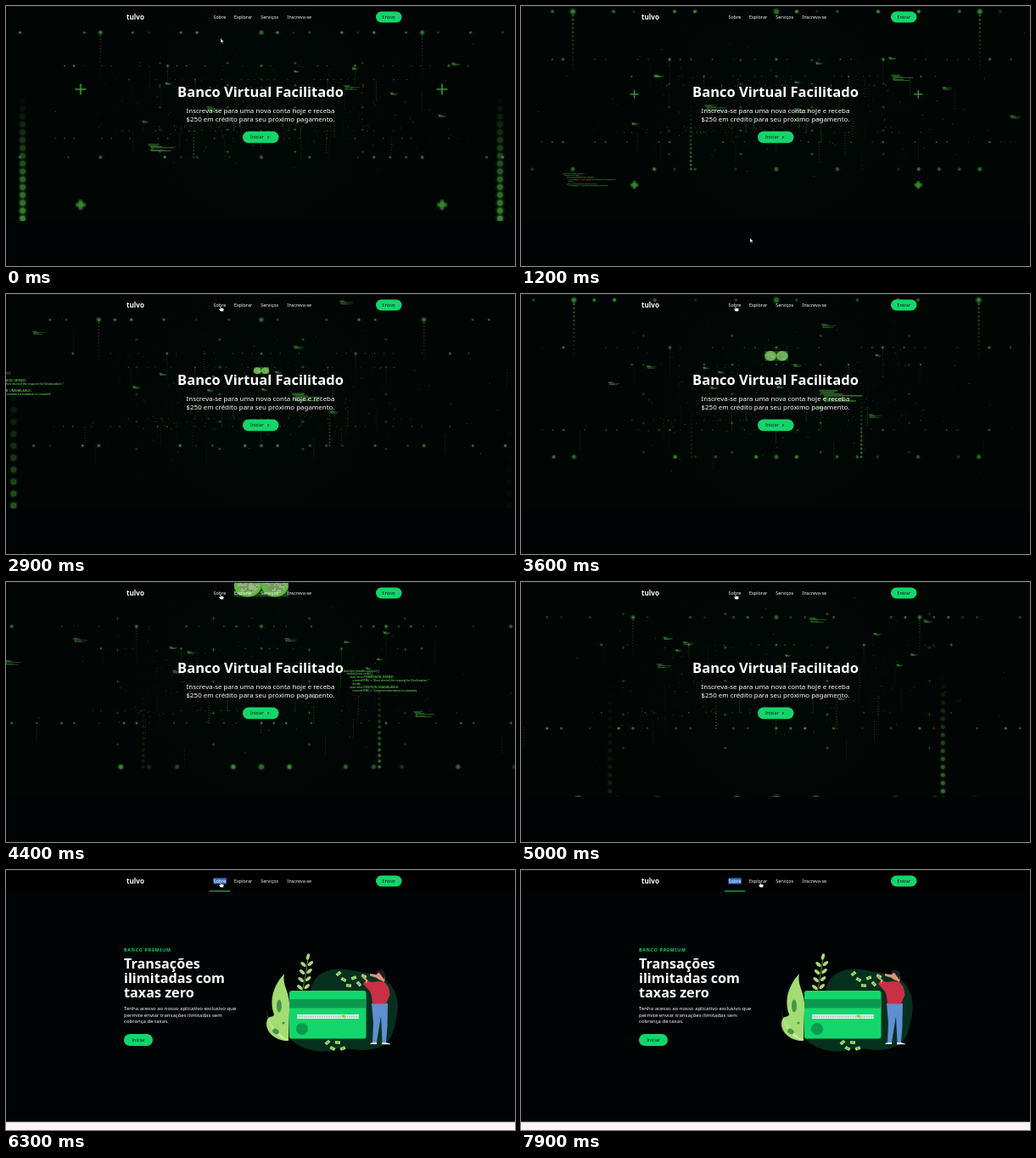
Recreate the animation shown at these times as an HTML page with a canvas. Size 600x306 px, loop 8 s.

```html
<!DOCTYPE html>
<html lang="pt">
<head>
<meta charset="utf-8">
<title>Banco Virtual</title>
<style>
html, body { margin: 0; width: 100%; height: 100%; overflow: hidden; background: #010405; }
#stage { position: relative; width: 600px; height: 306px; overflow: hidden; }
canvas, svg { position: absolute; left: 0; top: 0; display: block; }
text { font-family: "Noto Sans", "Open Sans", sans-serif; fill: #fff; }
.bold { font-weight: 700; }
.link { font-size: 5.4px; }
.lead { font-size: 7.95px; text-anchor: middle; }
.title { font-size: 16.2px; }
.para { font-size: 6px; }
.dark { fill: #01170d; }
.green { fill: #12d66c; }
.leaf { fill: #a4dc74; }
</style>
</head>
<body>
<div id="stage">
<canvas id="video" width="600" height="253"></canvas>
<svg width="600" height="306" viewBox="0 0 600 306">
  <g id="page">
    <rect y="253" width="600" height="271" fill="#010405"/>
    <rect y="523.5" width="600" height="60" fill="#fff4f8"/>
    <g id="hero">
      <text class="bold" x="300" y="107" font-size="16.5" text-anchor="middle">Banco Virtual Facilitado</text>
      <text class="lead" x="300" y="126.4">Inscreva-se para uma nova conta hoje e receba</text>
      <text class="lead" x="300" y="135.6">$250 em crédito para seu próximo pagamento.</text>
      <rect class="green" x="279" y="147.5" width="42.5" height="13.8" rx="6.9"/>
      <text class="link dark" x="288" y="156.4">Iniciar</text>
      <path d="M308.3 153l1.4 1.4-1.4 1.4" fill="none" stroke="#01170d"/>
    </g>
    <g transform="translate(0 227)">
      <text class="bold" x="139" y="96.2" font-size="5.2" letter-spacing=".8" style="fill:#12d66c">BANCO PREMIUM</text>
      <text class="bold title" x="139" y="116">Transações</text>
      <text class="bold title" x="139" y="133">ilimitadas com</text>
      <text class="bold title" x="139" y="149.6">taxas zero</text>
      <text class="para" x="139" y="165.2">Tenha acesso ao nosso aplicativo exclusivo que</text>
      <text class="para" x="139" y="172.7">permite enviar transações ilimitadas sem</text>
      <text class="para" x="139" y="180.2">cobrança de taxas.</text>
      <rect class="green" x="139" y="193" width="34" height="14" rx="7"/>
      <text class="link dark" x="148.3" y="202">Iniciar</text>

      <path d="M360 140C362 122 382 114 400 117S430 121 443 127C462 136 465 160 459 179C456 197 450 208 430 211C407 215 402 206 385 212C369 216 348 212 334 198Z" fill="#05301d"/>
      <path class="leaf" d="M333 201C318 202 303 189 308 176C310 171 315 174 316 170C309 150 318 133 328 122C325 137 336 144 334 165Z"/>
      <path d="M307 164C309 182 318 192 333 200C322 200 309 186 307 164Z" fill="#d0efa8"/>
      <g fill="#43974c">
        <ellipse cx="322" cy="160" rx="3" ry="7.5"/>
        <ellipse cx="318" cy="190" rx="4" ry="3" transform="rotate(30 318 190)"/>
        <circle cx="327" cy="180" r="1.6"/>
      </g>
      <path d="M356 104Q354 122 349 144" fill="none" stroke="#a4dc74" stroke-width=".6"/>
      <g id="sprig" class="leaf"></g>
      <rect class="green" x="334" y="142" width="90.5" height="56.5" rx="3"/>
      <path d="M334 152h90.5v10.5H334z" fill="#0a9a4e"/>
      <path d="M343 170h73v5h-73z" fill="#e9f2ee"/>
      <path d="M343 172.5h73" stroke="#b4b9c4" stroke-width="3" stroke-dasharray=".8 .8"/>
      <circle cx="349" cy="187" r="7" fill="#0a9a4e"/>
      <g id="bills" class="leaf"></g>

      <path d="M431 157L450 157L449.5 184L448 203H443.5L442 172L437 203H432L433 180Z" fill="#5f8fd0"/>
      <path d="M431 203h6v2h-8zM443 203h5l5 1.4v.8H443z" fill="#e9edf2"/>
      <path d="M432 132Q440 130 446 132Q452 136 452.5 147L448 157.5H432Q431 146 429 143L421 134L424 130Z" fill="#c92f45"/>
      <path d="M424 130L420 127L421 125L427 130L424 134ZM447 126L436 123L429 122L429 124.5L437 127L446 132Z" fill="#dc9677"/>
      <ellipse cx="441" cy="124.5" rx="4" ry="5" fill="#dc9677"/>
      <path d="M436 122Q436 117 442 117.5Q449 119 446 129L443 125L440 121Z" fill="#251b25"/>
    </g>
  </g>
  <rect id="navBack" width="600" height="25.5" fill="#000"/>
  <rect width="600" height="1" fill="#14181b"/>
  <rect id="selection" x="244.5" y="9.5" width="15.3" height="7" fill="#3974c8"/>
  <rect id="underline" class="green" x="240" y="24.4" width="24" height="1.1"/>
  <text class="bold" x="142" y="16" font-size="8.1">tulvo</text>
  <text class="link" x="244.6" y="15">Sobre</text>
  <text class="link" x="269" y="15">Explorar</text>
  <text class="link" x="300.3" y="15">Serviços</text>
  <text class="link" x="331.6" y="15">Inscreva-se</text>
  <rect class="green" x="436" y="6.5" width="30.5" height="13" rx="6.5"/>
  <text class="link dark" x="443.4" y="15">Entrar</text>
  <g id="cursor" stroke="#000" stroke-width=".4" fill="#fff">
    <path id="arrow" d="M0 0V5.4L1.2 4.3L2.1 6.3L3 5.9L2.1 4L3.8 3.9Z"/>
    <path id="hand" d="M-.6 .2Q0-.6 .6 .2V2.4L3.2 3Q4 3.3 3.8 4.4L3.2 6.6H-.1L-2.2 4.1Q-2.2 3-1.2 3.4L-.6 4Z"/>
  </g>
</svg>
</div>
<script>
const LOOP = 8000, STEP = 100;
// World lengths are in thousands, depth is the travel time to the camera in ms.
const CX = 301, CY = 125, UNIT = 68, FLOOR = 190, CEILING = -336;
const $ = id => document.getElementById(id);
const ctx = $('video').getContext('2d');
const clamp = (v, a = 0, b = 1) => Math.min(b, Math.max(a, v));
const hash = n => { const s = Math.sin(n * 12.9898 + 4.1) * 43758.5453; return s - Math.floor(s); };
const range = (n, f) => Array.from({ length: n }, (_, i) => f(i));
const green = a => `rgba(82,186,68,${clamp(a)})`;
const project = (x, y, z) => [CX + x * 1000 / z, CY + y * 1000 / z];

function track(keys, t) {
  let i = 0;
  while (i < keys.length - 2 && t > keys[i + 1][0]) i++;
  const [a, b] = [keys[i], keys[i + 1]];
  const p = clamp((t - a[0]) / (b[0] - a[0]));
  return a.slice(1).map((v, j) => v + (b[j + 1] - v) * p);
}

const travel = [[0, 0], [1200, 750], [2100, 1810], [8000, 7690]];
const pointer = [[0, 253, 38], [900, 263, 200], [1200, 270, 273], [2000, 257, 19], [2500, 253, 14],
  [7000, 253, 14], [7700, 282, 14]];

function disc(px, py, r, alpha) {
  ctx.fillStyle = green(alpha);
  ctx.beginPath();
  ctx.arc(px, py, r, 0, 7);
  ctx.fill();
}

function dot(x, y, z, alpha, size = 5) {
  const [px, py] = project(x, y, z), r = Math.max(.6, size * 1000 / z);
  if (r > 1) disc(px, py, r * 1.6, alpha * .25);
  disc(px, py, r, alpha * .75);
}

function row(y, z, seed) {
  for (let i = -22; i <= 22; i++) {
    const h = hash(i + seed);
    if (i % 10 === 0) dot(i * UNIT, y, z, .6, y < 0 ? 8 : 6);
    else if (h > .45) dot(i * UNIT, y, z, .15 + .75 * (h - .45) / .55, 3.5 + 1.5 * h);
  }
}

// A run of dots that fades with distance from the floor or ceiling it starts at.
function column(x, y, reach, z, alpha) {
  for (let i = 0; i < 16; i++)
    dot(x, y + reach * i / 16, z, alpha * (1 - i / 16), 3.4);
}

// Dot rows repeat at equal depths, with inner columns rising and outer ones hanging.
function drawGates(depth) {
  for (let n = 4; n >= 0; n--) {
    const z = 1015 + 2570 * n - depth;
    if (z < 250) continue;
    row(FLOOR, z, n * 31);
    row(CEILING, z, n * 47 + 9);
    for (const side of [-1, 1]) {
      column(side * 4.2 * UNIT, n ? FLOOR : 127, n ? -220 : -150, z, n ? .7 * hash(n + side * 5) : .8);
      column(side * 10 * UNIT, CEILING, 220, z, .5);
    }
  }
}

function plus(x, y, z, alpha) {
  const [px, py] = project(x, y, z), arm = clamp(15000 / z, 1.4, 7);
  ctx.lineCap = 'round';
  for (const [w, a] of [[.5, .22], [.2, .85]]) {
    ctx.strokeStyle = green(a * alpha);
    ctx.lineWidth = Math.max(.8, w * arm);
    ctx.beginPath();
    ctx.moveTo(px - arm, py); ctx.lineTo(px + arm, py);
    ctx.moveTo(px, py - arm); ctx.lineTo(px, py + arm);
    ctx.stroke();
  }
}

// The same mark out of focus: four soft blobs.
function softPlus(x, y, z, alpha) {
  for (const [dx, dy] of [[-1, 0], [1, 0], [0, -1], [0, 1], [0, 0]])
    dot(x + dx * 9, y + dy * 9, z, alpha * .6, 6);
}

function drawPluses(depth) {
  for (const z0 of [2596, 4055]) {
    const z = z0 - depth, alpha = clamp((4000 - z) / 600) * clamp((z - 1900) / 200);
    if (alpha <= 0) continue;
    for (const x of [-553, 553]) {
      plus(x, -70, z, alpha);
      softPlus(x, 283, z, alpha);
    }
  }
  for (let i = -3; i <= 3; i += 2)
    for (let j = -2; j <= 2; j++) plus(i * 553, j * 363 - 78, 13895 - depth, .55 - .08 * Math.abs(i));
}

const code = `function showError(error) {
 switch(error.code) {
  case error.PERMISSION_DENIED:
   x.innerHTML = "User denied the request for Geolocation."
   break;
  case error.POSITION_UNAVAILABLE:
   x.innerHTML = "Location information is unavaila`.split('\n');

const blocks = [
  { z: 4981, x: 85, y: -20, scale: 1 },
  { z: 3223, x: -210, y: -21, scale: .75 },
  { z: 2650, x: 256, y: -84, scale: .6 },
  { z: 1600, x: -214, y: 60, scale: .6 },
  ...range(26, i => ({
    z: 2800 + i * 280, x: (hash(i + .2) - .5) * 1300, y: -230 + 310 * hash(i + .6), scale: .36
  }))
];

function drawBlock({ z: z0, x, y, scale }, depth) {
  const z = z0 - depth;
  if (z < 350 || z > 4600) return;
  const [px, py] = project(x, y, z), size = 2900 * scale / z, step = size * 1.17;
  ctx.font = `bold ${size}px "Liberation Sans", sans-serif`;
  ctx.fillStyle = green(size < 2 ? .65 : 1);
  code.forEach((line, i) => {
    const text = line.trim(), left = px + (line.length - text.length) * size * 1.1, top = py + i * step;
    if (size < 2) ctx.fillRect(left, top, text.length * size * .46, Math.max(.5, size * .8));
    else ctx.fillText(text, left, top + size);
  });
}

// Two rounded green shapes filled with grey speckle.
function drawPanel(depth) {
  const z = 4705 - depth;
  if (z < 300 || z > 3400) return;
  const [px, py] = project(0, -73, z), w = 38600 / z, h = 16300 / z;
  ctx.fillStyle = green(.35);
  ctx.fillRect(px - w / 2, py - h / 2, w, h);
  for (const side of [-1, 1]) {
    ctx.fillStyle = '#62b843';
    ctx.beginPath();
    ctx.ellipse(px + side * w / 4, py, w / 4, h / 2, 0, 0, 7);
    ctx.fill();
  }
  const cell = w / 30;
  for (let i = 1; i < 29; i++) for (let j = 1; j < 12; j++) {
    const inX = Math.abs(i % 15 - 7.5) / 5.5, inY = Math.abs(j - 6) / 4.5;
    if (inX ** 2 + inY ** 2 > 1) continue;
    ctx.fillStyle = hash(i * 17 + j * 5) < .5 ? '#b4b8a8' : '#7d8a6c';
    ctx.fillRect(px - w / 2 + i * cell, py - h / 2 + j * h / 13, cell * .8, cell * .8);
  }
}

function drawDust(depth) {
  for (let i = 0; i < 420; i++) {
    const z = 5000 + 12000 * hash(i + .3) - depth;
    if (z < 3800) continue;
    const [px, py] = project((hash(i + .5) - .5) * 2900, -520 + 900 * hash(i + .7), z);
    ctx.fillStyle = green(.1 + .5 * hash(i + .9) ** 2);
    const run = i % 12 ? 1 : 8;
    for (let k = 0; k < run; k++) ctx.fillRect(px, py + k * 3, .9, .9);
  }
}

function drawVideo(t) {
  const [depth] = track(travel, t);
  ctx.fillStyle = '#010504';
  ctx.fillRect(0, 0, 600, 253);
  const glow = ctx.createRadialGradient(CX, CY, 10, CX, CY, 260);
  glow.addColorStop(0, 'rgba(8,30,18,.16)');
  glow.addColorStop(1, 'rgba(4,14,9,0)');
  ctx.fillStyle = glow;
  ctx.fillRect(0, 0, 600, 253);
  drawDust(depth);
  drawGates(depth);
  drawPluses(depth);
  blocks.forEach(b => drawBlock(b, depth));
  drawPanel(depth);
}

function scrollAt(t) {
  const p = clamp((t - 5493) / 500);
  return 227 * (p < .5 ? 2 * p * p : 1 - 2 * (1 - p) ** 2);
}

const show = (id, on) => $(id).setAttribute('visibility', on ? 'visible' : 'hidden');
const move = (id, x, y) => $(id).setAttribute('transform', `translate(${x} ${y})`);

function render(t) {
  const scroll = scrollAt(t), [x, y] = track(pointer, t);
  if (scroll < 227) drawVideo(t);
  $('video').style.transform = `translateY(${-scroll}px)`;
  move('page', 0, -scroll);
  show('navBack', scroll >= 25);
  show('underline', scroll > 200);
  show('selection', t >= 5400);
  move('cursor', x, y);
  show('hand', y < 25);
  show('arrow', y >= 25);
}

function buildArt() {
  const ellipse = (x, y, a) => `<ellipse cx="${x}" cy="${y}" rx="3.8" ry="1.9" transform="rotate(${a} ${x} ${y})"/>`;
  const pair = i => {
    const x = 354.5 - i * 1.4, y = 111 + i * 9;
    return ellipse(x - 4, y, 40) + ellipse(x + 4.5, y - 1, -40);
  };
  $('sprig').innerHTML = ellipse(356, 102, -75) + range(4, pair).join('');

  const bill = (x, y, i) => `<g transform="translate(${x} ${y}) rotate(${-40 + i * 67 % 90})">
    <rect x="-3" y="-1.8" width="6" height="3.6"/><circle r="1" fill="#6cb653"/></g>`;
  $('bills').innerHTML = bill(398, 172, 1)
    + range(6, i => bill(392 + i * 6, 122 + i * 7 % 16, i)).join('')
    + range(4, i => bill(379 + i * 6, 203 + i % 2 * 7, i)).join('');
}

buildArt();
const start = performance.now();
function tick(now) {
  const t = Math.max(0, now - start) % LOOP;
  render(Math.floor(t / STEP) * STEP);
  requestAnimationFrame(tick);
}
render(0);
requestAnimationFrame(tick);
</script>
</body>
</html>
```
